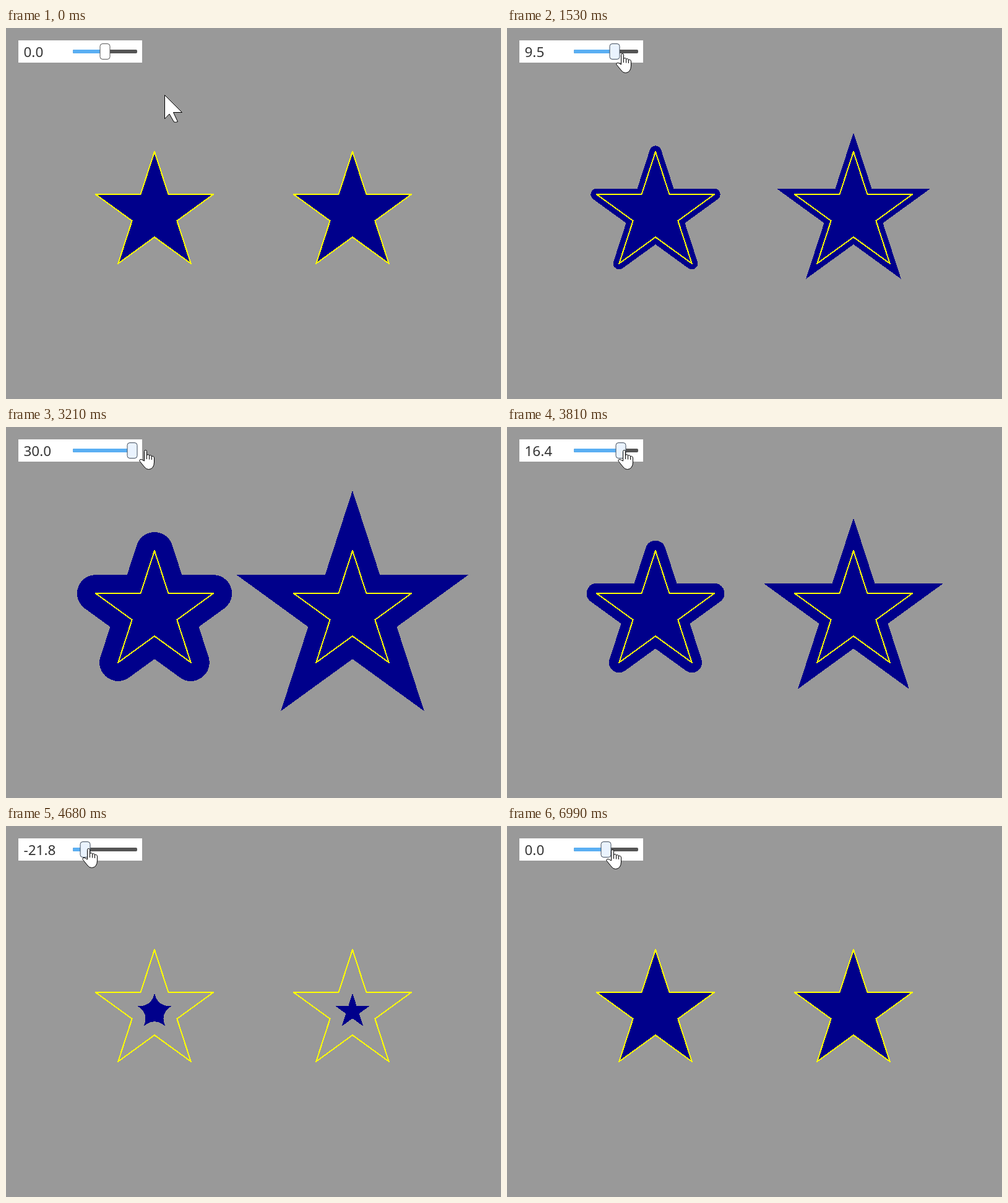
An HTML page for the animation above (7080 ms loop, 800 by 600 pixels).

```html
<!DOCTYPE html>
<html lang="en">
<head>
<meta charset="utf-8">
<title>Star offset</title>
<style>
  html, body { margin: 0; width: 100%; height: 100%; overflow: hidden; background: #999; }
  svg { display: block; }
  text { font: 22.5px "Noto Sans", sans-serif; fill: #333; white-space: pre; }
  .star { shape-rendering: crispEdges; }
  .body { fill: #00008b; stroke-miterlimit: 10; }
  .outline { fill: none; stroke: #ff0; stroke-width: 2; stroke-linejoin: round; }
  .thumb { fill: #fff; stroke: #555; }
  .thumb.active { fill: #eaf3fe; stroke: #414d5c; }
  .cursor { fill: #fff; stroke: #000; stroke-linejoin: round; }
</style>
</head>
<body>
<svg width="800" height="600" viewBox="0 0 800 600">
  <defs><path id="shape"/></defs>
  <g class="star" transform="translate(240 300)">
    <use class="body" href="#shape" stroke-linejoin="round"/>
    <use class="outline" href="#shape"/>
  </g>
  <g class="star" transform="translate(560 300)">
    <use class="body" href="#shape" stroke-linejoin="miter"/>
    <use class="outline" href="#shape"/>
  </g>
  <rect x="20" y="20" width="200" height="36" fill="#fff"/>
  <text id="label" x="28.5" y="47"></text>
  <rect x="108" y="35" width="104" height="6" rx="2" fill="#555"/>
  <rect id="filled" x="108" y="35" height="6" rx="2" fill="#5aaff3"/>
  <rect id="thumb" class="thumb" x="-8" y="25.5" width="16" height="25" rx="4"/>
  <path id="arrow" class="cursor" d="M.5 .5V39L8 31L15.5 44Q18.5 45 21.5 43.5L14.5 28.5H28.5Z"/>
  <g id="hand" class="cursor">
    <path d="M8.5 18V2.5Q8.5 .5 10.5 .5T12.5 2.5V9.5Q12.8 7.5 14.6 7.5T16.5 9.8Q16.8 8.5 18.6 8.7T20.5 11
      Q20.8 10 22.5 10.3T24.5 13V20Q24.5 25 22 28.5Q19.5 31.5 15.5 31.5Q11.5 31.5 9 28L1.3 18.5
      Q.2 16.8 1.5 15.8Q3 14.8 5 16Z"/>
    <path d="M12.5 9V15M16.5 9.8V15.5M20.5 11V16" fill="none"/>
  </g>
</svg>
<script>
const LOOP = 7080, TICK = 30, LAG = 80;
const ZERO_X = 160, HALF_TRAVEL = 44, MAX_OFFSET = 30, GRIP = 11;

// Pointer moves; x is the distance from its grip on the centred thumb.
const REST = { x: 85, y: 108 };
const MOVES = [
  { from: 30, to: 570, x: 0, y: 42, power: 2 },
  { from: 830, to: 3233, x: 56, y: 37 },
  { from: 3233, to: 4680, x: -37, y: 36 },
  { from: 4680, to: 5020, x: -59, y: 50 },
  { from: 5399, to: 5400, x: -54, y: 37 },
  { from: 5700, to: 6900, x: 0, y: 38, power: 2.6 },
];

const byId = id => document.getElementById(id);
const clamp = (v, lo, hi) => Math.max(lo, Math.min(hi, v));
const bodies = document.querySelectorAll('.body');

function pointerAt(t) {
  let { x, y } = REST;
  for (const move of MOVES) {
    const u = clamp((t - move.from) / (move.to - move.from), 0, 1);
    const eased = 1 - (1 - u) ** (move.power || 1);
    x += (move.x - x) * eased;
    y += (move.y - y) * eased;
  }
  return { x, y };
}

function starPath(radius) {
  const points = Array.from({ length: 10 }, (_, i) => {
    const r = i % 2 ? radius * 0.381966 : radius, a = i * Math.PI / 5;
    return `${r * Math.sin(a)} ${-r * Math.cos(a)}`;
  });
  return `M${points.join('L')}Z`;
}

function place(element, x, y, visible) {
  element.setAttribute('transform', `translate(${Math.round(x)} ${Math.round(y)})`);
  element.style.display = visible ? '' : 'none';
}

function draw(time) {
  const t = Math.floor(time % LOOP / TICK) * TICK;
  const pointer = pointerAt(t);
  const dragged = t > 800 ? Math.round(pointerAt(t - LAG).x) : 0;
  const steps = clamp(dragged, -HALF_TRAVEL, HALF_TRAVEL);
  const offset = steps * MAX_OFFSET / HALF_TRAVEL;
  const active = t >= 570 || (pointer.x < 10 && pointer.y < 50);

  // A navy border grows the star; a background-coloured one erodes it.
  for (const body of bodies) {
    body.setAttribute('stroke', offset > 0 ? '#00008b' : '#999');
    body.setAttribute('stroke-width', 2 * Math.abs(offset));
  }
  byId('label').textContent = offset.toFixed(1);
  byId('filled').setAttribute('width', ZERO_X + steps - 108);
  byId('thumb').classList.toggle('active', active);
  place(byId('thumb'), ZERO_X + steps, 0, true);
  place(byId('arrow'), ZERO_X + GRIP + pointer.x, pointer.y, !active);
  place(byId('hand'), ZERO_X + pointer.x, pointer.y, active);
}

byId('shape').setAttribute('d', starPath(100));
const start = performance.now();
function frame() {
  draw(performance.now() - start);
  requestAnimationFrame(frame);
}
frame();
</script>
</body>
</html>
```
